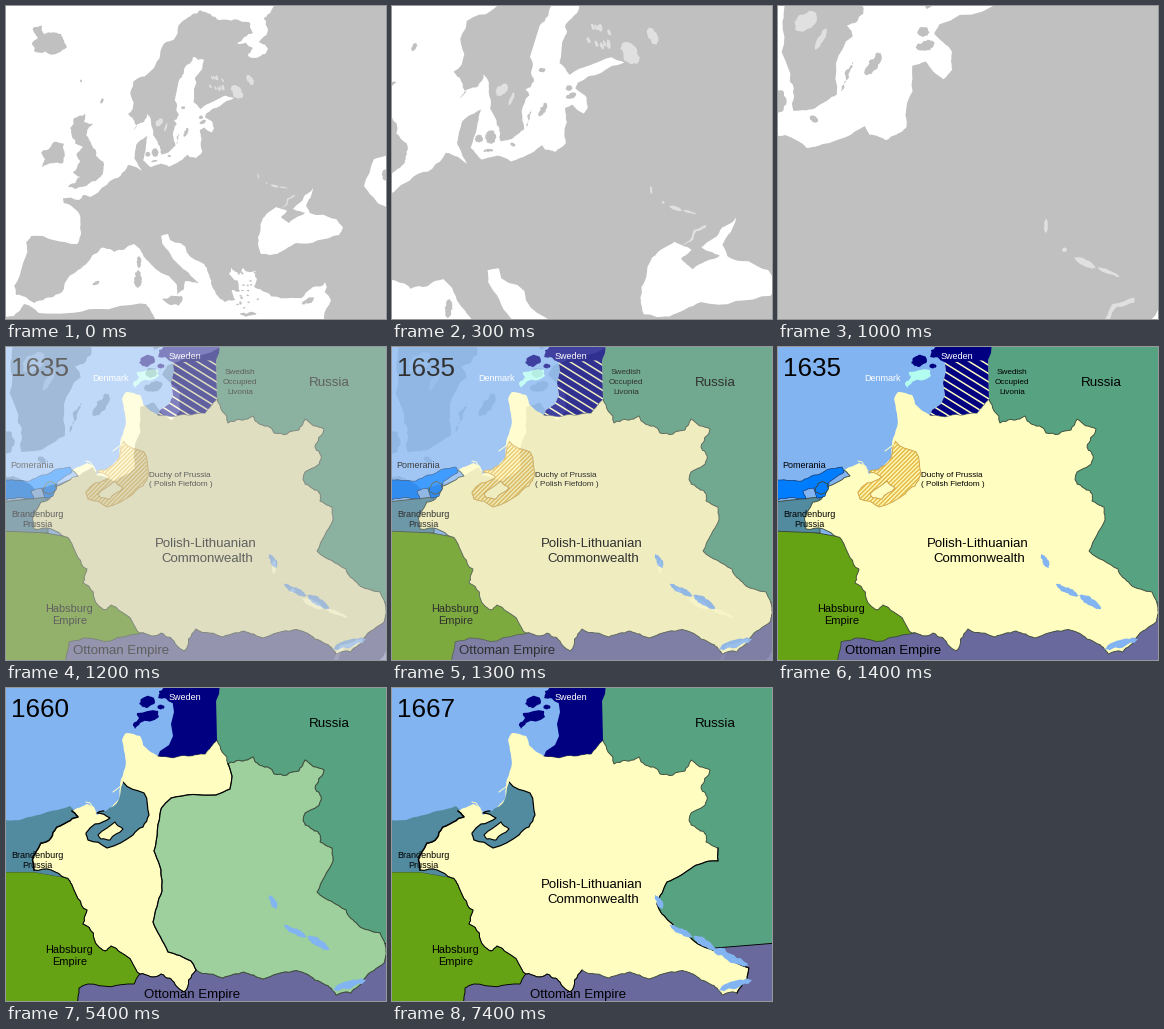
A matplotlib script that plays this animation: 380 by 313 pixels, repeating every 8 s.

```python
import numpy as np
import matplotlib.pyplot as plt
from matplotlib.animation import FuncAnimation
from matplotlib.patches import Polygon, Rectangle
from matplotlib.transforms import Affine2D

W, H, DPI = 380, 313, 100
PX = 72 / DPI
ZOOM_END, FADE_END = 10, 14
SCENE_STARTS = (34, 54, 74)
LAND, LAKE = "#c0c0c0", "#e0e0e0"
SEA, YELLOW, RUSSIA, NAVY = "#82b4f1", "#fffdc0", "#57a281", "#000080"
BRANDENBURG, POMERANIA, HABSBURG = "#528b9f", "#007cff", "#66a314"
OTTOMAN, LITHUANIA, DANISH, FIEF = "#6a699e", "#9dd09c", "#b2fcf0", "#e6bb48"
EDGE = "#3c4a3a"
ALL = (0, 1, 2, 3)

rng = np.random.default_rng(7)
plt.rcParams["font.family"] = "Liberation Sans"
fig = plt.figure(figsize=(W / DPI, H / DPI), dpi=DPI, facecolor="white")


def layer():
    ax = fig.add_axes([0, 0, 1, 1])
    ax.set_xlim(0, W)
    ax.set_ylim(H, 0)
    ax.axis("off")
    return ax


def rough(pts, amp=0.1, levels=3):
    """Crinkle a line by displacing midpoints sideways."""
    pts = np.asarray(pts, float)
    for _ in range(levels):
        step = np.diff(pts, axis=0)
        side = np.column_stack([-step[:, 1], step[:, 0]])
        push = np.clip(rng.normal(0, amp, (len(step), 1)), -1.5 * amp, 1.5 * amp)
        out = np.empty((2 * len(pts) - 1, 2))
        out[::2] = pts
        out[1::2] = pts[:-1] + step / 2 + side * push
        pts = out
    return pts


def ring(pts, amp=0.1, levels=2):
    return rough(list(pts) + [pts[0]], amp, levels)


def blob(x, y, rx, ry, tilt=0, amp=0.14):
    """A ragged ellipse."""
    a = np.linspace(0, 2 * np.pi, 8, endpoint=False)
    oval = np.column_stack([rx * np.cos(a), ry * np.sin(a)])
    return ring(Affine2D().rotate_deg(tilt).translate(x, y).transform(oval), amp)


# ---- grey map of Europe, turning while it grows ----
SCALE, TURN = 2.8, 12
HUB, HUB_END = np.array([184, 151]), np.array([92, 128])


def place(tr, t):
    ease = np.sin(t * np.pi / 2)
    s = SCALE ** ease
    hub = HUB + (HUB_END - HUB) * (s - 1) / (SCALE - 1)
    return tr.clear().translate(*-HUB).rotate_deg(TURN * ease).scale(s).translate(*hub)


CLOSE_UP = place(Affine2D(), 0.6).inverted()


def near(pts):
    """Points measured on the enlarged map, brought back to the whole one."""
    return CLOSE_UP.transform(np.array(pts, float))


zoom = Affine2D()
europe = layer()


def grey(pts, color=LAND):
    europe.add_patch(Polygon(pts, fc=color, ec="none", transform=zoom + europe.transData))


norway = [(265, 5), (258, 12), (262, 24), (253, 36), (262, 43), (250, 52), (242, 50),
          (247, 42), (231, 37), (247, 27), (243, 16), (214, 14), (194, 4), (178, 14),
          (160, 36), (148, 62), (125, 84), (122, 108), (131, 120)]
sweden = [(0, 52), (28, 36), (37, 20), (42, 45), (50, 94), (54, 118), (74, 113),
          (89, 103), (100, 55), (95, 46), (108, 36), (105, 0)]
bothnia = [(173, 74), (180, 60), (187, 51), (198, 54), (189, 72), (188, 83)]
baltic = [(150, 0), (147, 12), (160, 30), (222, 9), (240, 18), (171, 42), (167, 50),
          (182, 64), (183, 79), (176, 87), (161, 73), (150, 77), (146, 118), (147, 128),
          (131, 139), (117, 135), (113, 128), (80, 144), (66, 148), (48, 138),
          (24, 142), (10, 124), (20, 100), (29, 70), (1, 85), (-9, 115), (3, 147)]
atlantic = [(130, 161), (122, 159), (103, 176), (84, 191), (77, 189), (73, 194),
            (57, 192), (58, 197), (72, 206), (75, 226), (71, 238), (25, 230), (20, 236),
            (20, 250), (8, 280), (10, 289), (28, 297), (47, 291), (58, 283), (62, 272),
            (82, 256), (95, 242), (108, 246), (128, 238)]
italy = [(134, 243), (143, 256), (163, 270), (171, 279), (171, 289), (178, 283),
         (179, 275), (193, 277), (172, 258), (156, 237), (155, 230), (162, 228)]
aegean = [(164, 234), (198, 258), (205, 277), (219, 296), (229, 294), (226, 284),
          (234, 285), (223, 268), (225, 262), (233, 269), (237, 262), (266, 257),
          (250, 264), (248, 281), (272, 291), (298, 290), (319, 276), (318, 312)]
grey(np.vstack([[(290, -40)], rough(norway, 0.13), rough(near(sweden), 0.1),
                rough(bothnia), rough(near(baltic), 0.05), rough(atlantic, 0.08),
                rough(italy, 0.05), rough(aegean, 0.12),
                [(316, 360), (430, 360), (430, -40)]]))
grey(np.vstack([rough([(-20, 314), (8, 310), (18, 298), (33, 307), (90, 303), (140, 298),
                       (150, 316)], 0.05), [(150, 360), (-20, 360)]]))

black_sea = [(255, 248), (252, 238), (257, 212), (270, 201), (281, 205), (275, 211),
             (283, 217), (299, 207), (287, 203), (299, 189), (307, 182), (300, 200),
             (304, 207), (330, 213), (337, 221), (333, 229), (290, 237), (271, 248)]
grey(ring(black_sea, 0.06, 3), "white")
grey(ring([(390, 146), (368, 153), (358, 180), (366, 190), (373, 198), (390, 206)], 0.05),
     "white")
grey(blob(379, 169, 3, 6))

britain = [(68, 112), (80, 107), (78, 116), (87, 118), (80, 129), (90, 150), (98, 158),
           (96, 169), (90, 175), (62, 181), (74, 171), (67, 166), (74, 156), (71, 147),
           (77, 141), (69, 138), (64, 122)]
ireland = [(48, 136), (58, 138), (57, 157), (36, 161), (39, 153), (35, 147), (43, 143)]
iceland = [(27, 22), (36, 20), (38, 28), (55, 28), (61, 41), (50, 48), (28, 45),
           (26, 37), (32, 32)]
for isle in (britain, ireland, iceland, [(156, 293), (176, 290), (173, 300)]):
    grey(ring(isle, 0.11, 3))
for isle in ((132, 273, 4, 9), (133, 256, 2.5, 6), (243, 308, 9, 1.6), (302, 295, 7, 2.5, -25),
             (90, 277, 4, 1.6, -25), (96, 95, 1.2, 3, 20), (75, 75, 1, 1.5)):
    grey(blob(*isle))
for x, y, rx, ry, tilt in ((23, 112, 6, 6, 0), (40, 111, 8, 10, 0), (35, 130, 7, 2.5, 0),
                           (71, 124, 4, 2.5, 30), (97, 88, 13, 1.6, -70),
                           (118, 77, 11, 4.5, -58), (160, 60, 8, 4, -15), (158, 49, 5, 4, 0),
                           (121, 20, 5, 3, 0)):
    grey(near(blob(x, y, rx, ry, tilt)))
for x, y in rng.uniform((230, 266), (258, 302), (26, 2)):
    grey(blob(x, y, 1.3, 0.8))

grey(blob(231, 86, 5, 8, -40), LAKE)
grey(blob(244, 74, 3, 6, -30), LAKE)
for x, y in rng.uniform((204, 68), (219, 84), (14, 2)):
    grey(blob(x, y, 0.9, 2.2, -30), LAKE)
for x, y, rx, ry, tilt in ((61, 44, 11, 7, -40), (74, 58, 10, 2.5, -65), (265, 204, 1.5, 6, 0),
                           (281, 223, 2, 2, 0), (298, 233, 10, 2.5, 25), (318, 240, 10, 1.5, 20)):
    grey(near(blob(x, y, rx, ry, tilt, 0.08)), LAKE)
grey(near(ring([(302, 289), (317, 278), (322, 266), (340, 260), (340, 264), (326, 268),
                (320, 280)], 0.06)), LAKE)

# ---- political map ----
states = layer()
parts = []


def show(artist, scenes):
    parts.append((artist, scenes))
    return artist


def area(pts, color, scenes=ALL, edge="none", lw=0.9):
    patch = Polygon(pts, fc=color, ec=edge, lw=lw * PX, joinstyle="round")
    return show(states.add_patch(patch), scenes)


def line(pts, color, scenes, lw=1.0):
    stroke, = states.plot(*np.transpose(pts), color=color, lw=lw * PX, zorder=1)
    return show(stroke, scenes)


def stripes(clip, color, slope, gap, lw, scenes):
    lo, hi = clip.get_xy().min(0), clip.get_xy().max(0)
    run = (hi[1] - lo[1]) / slope
    for x in np.arange(lo[0] - abs(run), hi[0] + abs(run), gap):
        line([(x, lo[1]), (x + run, hi[1])], color, scenes, lw).set_clip_path(clip)


def label(x, y, text, size, scenes=ALL, color="black"):
    show(states.text(x, y, text, size=size * PX, color=color, va="baseline"), scenes)


states.add_patch(Rectangle((0, 0), W, H, fc=SEA, ec="none"))
area([(210, -5), (385, -5), (385, 320), (300, 320), (205, 70)], RUSSIA)
area([(-5, 184), (28, 184), (62, 190), (150, 240), (150, 320), (-5, 320)], HABSBURG, ALL, EDGE)
rest = [(200, 270), (385, 255), (385, 320)]
area(np.vstack([rough([(58, 318), (63, 295), (78, 291), (132, 287)], 0.06), rest]),
     OTTOMAN, (0, 1), EDGE)
area(np.vstack([rough([(70, 318), (73, 300), (82, 296), (128, 296), (134, 286)], 0.04), rest]),
     OTTOMAN, (2, 3), "black")
area([(-5, 155), (42, 150), (42, 186), (-5, 184)], BRANDENBURG, (0,), EDGE)
area(np.vstack([rough([(-5, 132), (14, 132), (45, 123), (64, 118)], 0.03),
                [(72, 126), (62, 190), (28, 184), (-5, 184)]]), BRANDENBURG, (1, 2, 3))

riga = rough([(152, 68), (182, 68), (199, 66), (211, 52)], 0.05)
north_east = rough([(211, 52), (222, 76), (235, 73), (247, 69), (252, 76), (268, 86),
                    (293, 83), (299, 72), (318, 82), (309, 100), (315, 112), (299, 125),
                    (299, 137), (312, 144), (314, 154), (326, 160)], 0.1)
far_east = rough([(326, 160), (327, 173), (311, 204), (340, 222), (352, 237), (374, 245),
                  (380, 262), (378, 275), (358, 291), (345, 305)], 0.06)
dnieper = rough([(326, 160), (326, 173), (301, 179), (275, 194), (265, 216), (270, 226),
                 (284, 241), (306, 256), (357, 280), (355, 291), (345, 305)], 0.05)
steppe = rough([(345, 305), (330, 307), (318, 296), (301, 286), (287, 283), (257, 291),
                (238, 284), (217, 290), (190, 282)], 0.07)
carpathia = rough([(190, 282), (178, 304), (165, 291), (155, 286), (134, 286), (119, 267),
                   (105, 258), (99, 263), (92, 258), (77, 236), (81, 222), (66, 197),
                   (60, 190), (28, 182)], 0.09)
oder = rough([(28, 182), (27, 168), (35, 155), (45, 150), (51, 139), (72, 129), (66, 123)], 0.08)
coast = rough([(66, 123), (81, 116), (88, 119), (91, 127), (100, 124), (113, 111), (119, 80),
               (116, 52), (120, 45), (134, 48), (137, 57), (152, 68)], 0.04)
for east, scenes in ((far_east, (0, 1, 2)), (dnieper, (3,))):
    border = [riga, north_east, east, steppe, carpathia, oder]
    area(np.vstack(border + [coast]), YELLOW, scenes)
    line(np.vstack(border), EDGE, scenes, 0.9)
line(dnieper, "black", (3,), 1.1)

split = rough([(190, 282), (185, 273), (162, 264), (147, 234), (156, 203), (155, 182),
               (148, 163), (155, 121), (165, 110), (210, 107), (224, 101), (226, 88),
               (222, 76)], 0.03)
inner = north_east[8:]
area(np.vstack([split, inner, far_east, steppe]), LITHUANIA, (1, 2), EDGE)
line(split, "black", (1, 2), 1.2)
line(carpathia, "black", (1, 2, 3), 0.9)
line(oder, "black", (1, 2, 3), 1.5)

bay = rough([(-5, 133), (24, 134), (36, 128), (64, 120), (66, 125), (51, 135), (47, 149),
             (39, 151), (36, 141), (25, 144), (28, 152), (-5, 155)], 0.06)
area(bay, POMERANIA, (0,), "#123a70", 0.7)
area(blob(44, 141, 7, 6, -40), POMERANIA, (0,), EDGE)

duchy = ring([(117, 94), (138, 105), (143, 127), (137, 139), (127, 147), (101, 160),
              (82, 152), (80, 145), (89, 136), (104, 130), (91, 125), (100, 123),
              (113, 111)], 0.06)
warmia = ring([(92, 147), (109, 134), (117, 141), (104, 152), (95, 151)], 0.08)
fief = area(duchy, YELLOW, (0,), "#c99a40", 0.9)
stripes(fief, FIEF, -1, 4.2, 1.6, (0,))
area(warmia, YELLOW, (0,), "#c99a40", 0.9)
area(duchy, BRANDENBURG, (1, 2, 3))
line(duchy[:44], "black", (1, 2, 3), 1.2)
area(warmia, YELLOW, (1, 2, 3), "black", 1.1)
line([(118, 90), (115, 98), (107, 104)], YELLOW, ALL)
line([(90, 124), (84, 115), (80, 114)], YELLOW, ALL)

livonia = np.vstack([[(166, 10), (210, 10)], riga[::-1],
                     [(154, 63), (163, 57), (167, 48), (165, 36), (168, 24)]])
held = area(livonia, YELLOW, (0, 1))
# stripes stay on the eastern side; the gulf shore is left plain
stripes(held, NAVY, 0.62, 13.5, 5.6, (0, 1))
area(livonia, NAVY, (2, 3))
area(np.vstack([[(214, -5), (213, 6), (210, 13), (180, 15)],
                rough([(166, 15), (152, 10), (153, 3), (162, -5)], 0.1)]), NAVY)

saaremaa = ring([(127, 36), (133, 30), (131, 25), (152, 23), (153, 29), (134, 35),
                 (129, 41)], 0.1)
area(saaremaa, DANISH, (0,))
area(saaremaa, NAVY, (1, 2, 3))
area(blob(141, 14, 8, 5.5, -15), NAVY)
area(blob(155, 19, 3.5, 2.5), NAVY)

for lake in ((267, 214, 8, 2.8, 62), (289, 243, 13, 3, 28), (312, 255, 13, 3.5, 32),
             (343, 297, 18, 4, -17)):
    area(blob(*lake, 0.1), SEA)
area(blob(337, 269, 21, 3.5, 25), SEA, (3,))

for scene, year in enumerate((1635, 1657, 1660, 1667)):
    label(5, 29, str(year), 26, (scene,))
label(303, 39, "Russia", 13.4)
label(149, 200, "Polish-Lithuanian", 13.3, (0, 3))
label(155, 215, "Commonwealth", 13.3, (0, 3))
label(67, 307, "Ottoman Empire", 13.3, (0, 1))
label(138, 310, "Ottoman Empire", 13.3, (2, 3))
label(39, 265, "Habsburg", 11)
label(46, 277, "Empire", 11)
label(5, 170, "Brandenburg", 9)
label(16, 180, "Prussia", 9)
label(4, 121, "Pomerania", 9, (0,))
label(86, 34, "Denmark", 9, (0,), "white")
label(163, 12, "Sweden", 9, ALL, "white")
for row, (x, word) in enumerate(((219, "Swedish"), (217, "Occupied"), (221, "Livonia"))):
    label(x, 27 + 10 * row, word, 8.2, (0, 1))
label(143, 130, "Duchy of Prussia", 8.1, (0,))
label(143, 139, "( Polish Fiefdom )", 8.1, (0,))

mix = 0.0


def fade(img, dpi):
    img = img.copy()
    img[..., 3] *= mix
    return img, 0, 0


def draw(k):
    global mix
    mix = float(np.clip((k - ZOOM_END) / (FADE_END - ZOOM_END), 0, 1))
    place(zoom, min(k / ZOOM_END, 1))
    europe.set_visible(mix < 1)
    states.set_visible(mix > 0)
    states.set_agg_filter(fade if 0 < mix < 1 else None)
    scene = sum(k >= start for start in SCENE_STARTS)
    for artist, scenes in parts:
        artist.set_visible(scene in scenes)
    return []


anim = FuncAnimation(fig, draw, frames=80, init_func=lambda: draw(0), interval=100,
                     repeat=True, repeat_delay=0, blit=False)
plt.show()
```
